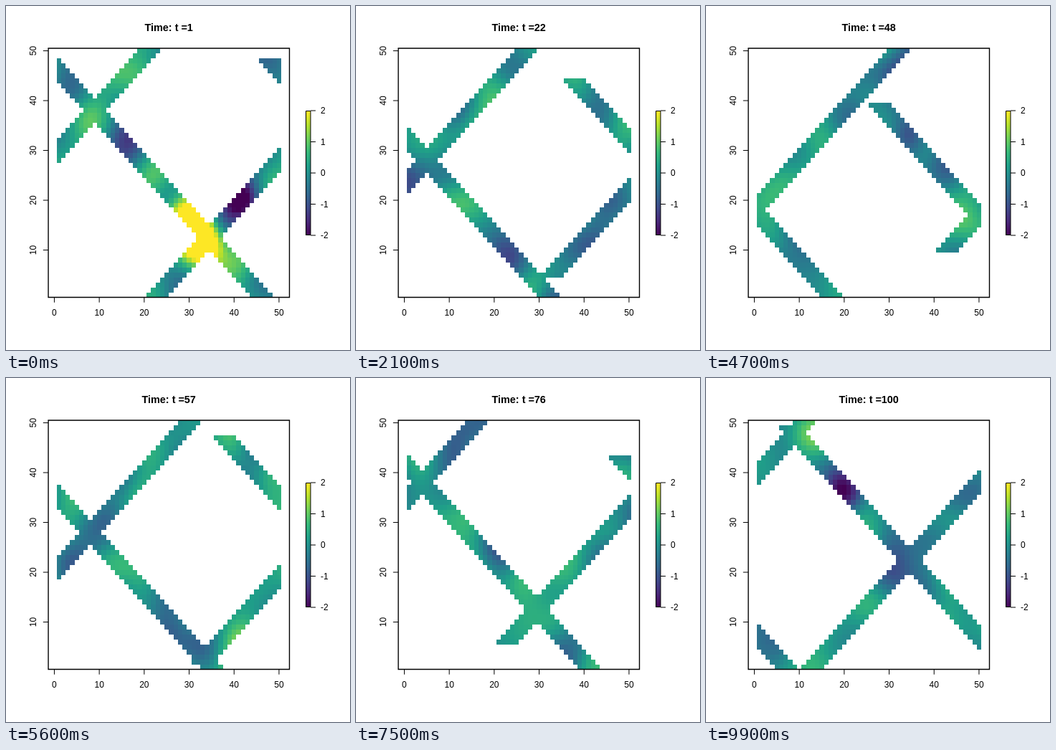
Recreate the animation shown at these times as an HTML page with a canvas. Size 480 by 480 pixels, loop 10000 ms.

```html
<!DOCTYPE html>
<html lang="en">
<head>
<meta charset="utf-8">
<title>Swath animation</title>
<style>
html, body { margin: 0; width: 100%; height: 100%; overflow: hidden; background: #fff; }
canvas, svg { position: absolute; left: 0; top: 0; }
text { font: 12px "Liberation Sans", Arial, sans-serif; text-anchor: middle; }
#title { font-size: 14.4px; font-weight: bold; }
path { fill: none; stroke: #000; }
</style>
</head>
<body>
<canvas id="cells" width="480" height="480"></canvas>
<svg width="480" height="480">
  <defs><linearGradient id="scale" x1="0" y1="1" x2="0" y2="0"></linearGradient></defs>
  <rect x="418" y="146" width="7" height="174" fill="url(#scale)"/>
  <g id="axes"></g>
  <text id="title" x="227.2" y="35"></text>
</svg>
<script>
const $ = id => document.getElementById(id);
const ctx = $('cells').getContext('2d');
const N = 50, STEPS = 100, STEP_MS = 100;
const px = x => 67.45 + 6.27 * x;
const py = y => 410.04 - 6.9504 * y;

const viridis = ['440154', '482878', '3e4a89', '31688e', '26828e', '1f9e89', '35b779', '6dcd59', 'b4de2c', 'fde725']
  .map(h => [0, 2, 4].map(i => parseInt(h.slice(i, i + 2), 16)));

function color(v) {
  const p = Math.min(1, Math.max(0, (v + 2) / 4)) * 9;
  const i = Math.min(8, Math.floor(p));
  return `rgb(${viridis[i].map((a, k) => Math.round(a + (viridis[i + 1][k] - a) * (p - i)))})`;
}

// The strongest extremes: time, x, y, value
const peaks = [
  [1, 29, 17, 3], [1, 33, 12, 4], [1, 42, 20, -2.4],
  [32, 35, 10, 1.6], [48, 35, 33, -1.8], [87, 33, 8, 2.2], [100, 20, 36, -2]
];

// Smooth random field made of seeded plane waves that drift in time
let seed = 7;
const rand = () => (seed = seed * 16807 % 2147483647) / 2147483647;
const waves = Array.from({ length: 24 }, () => {
  const a = rand() * 2 * Math.PI, k = .15 + .45 * rand();
  return [k * Math.cos(a), k * Math.sin(a), rand() - .5, rand() * 2 * Math.PI];
});

function field(x, y, t) {
  let v = 0;
  for (const [kx, ky, w, p] of waves) v += .12 * Math.cos(kx * x + ky * y + w * t + p);
  for (const [pt, cx, cy, a] of peaks)
    v += a * Math.exp(-((t - pt) ** 2) / 6 - ((x - cx) ** 2 + (y - cy) ** 2) / 18);
  return v;
}

function drawStrip(mid, y, t) {
  const y0 = Math.round(py(y + .5)), y1 = Math.round(py(y - .5));
  for (let x = Math.max(1, mid - 2); x <= Math.min(N, mid + 2); x++) {
    const x0 = Math.round(px(x - .5));
    ctx.fillStyle = color(field(x, y, t));
    ctx.fillRect(x0, y0, Math.round(px(x + .5)) - x0, y1 - y0);
  }
}

// Each step moves both tracks 10 cells sideways; every fifth step cuts off one more row
function draw(t) {
  const u = t % 50, m = u % 5, f = Math.floor(u / 5);
  const top = m ? 48 - f : 49 - f, bottom = f + 1;
  const down = (m ? 58 - 10 * m : 8) + top;
  const up = (m === 4 ? 2 : 13 + 10 * m) - bottom;

  ctx.clearRect(0, 0, 480, 480);
  for (let y = 1; y <= top; y++) [0, 49].forEach(wrap => drawStrip(down - wrap - y, y, t));
  for (let y = bottom; y <= N; y++) [0, 51].forEach(wrap => drawStrip(up - wrap + y, y, t));
  $('title').textContent = 'Time: t =' + t;
}

function drawAxes() {
  let ticks = '', labels = '', key = 'M418.5 146.5H425V319.5H418.5Z';
  for (let v = 0; v <= N; v += 10) {
    ticks += `M${px(v)} 406.5V413.7`;
    labels += `<text x="${px(v)}" y="432">${v}</text>`;
    if (!v) continue;
    ticks += `M59 ${py(v)}H51.8`;
    labels += `<text transform="translate(42 ${py(v)}) rotate(-90)">${v}</text>`;
  }
  for (let v = -2; v <= 2; v++) {
    const y = 233 - 43.5 * v;
    key += `M425 ${y}H432`;
    labels += `<text x="439" y="${y + 4.2}" style="text-anchor:start">${v}</text>`;
  }
  $('axes').innerHTML = `<path d="M59.04 59.04H395.5V406.56H59.04Z" stroke-width="1.4"/>
    <path d="${ticks}${key}"/>${labels}`;
  $('scale').innerHTML = viridis.map((c, i) => `<stop offset="${i / 9}" stop-color="rgb(${c})"/>`).join('');
}

let shown = 0;
function tick() {
  const t = Math.floor(performance.now() / STEP_MS) % STEPS + 1;
  if (t !== shown) draw(shown = t);
  requestAnimationFrame(tick);
}
drawAxes();
tick();
</script>
</body>
</html>
```
